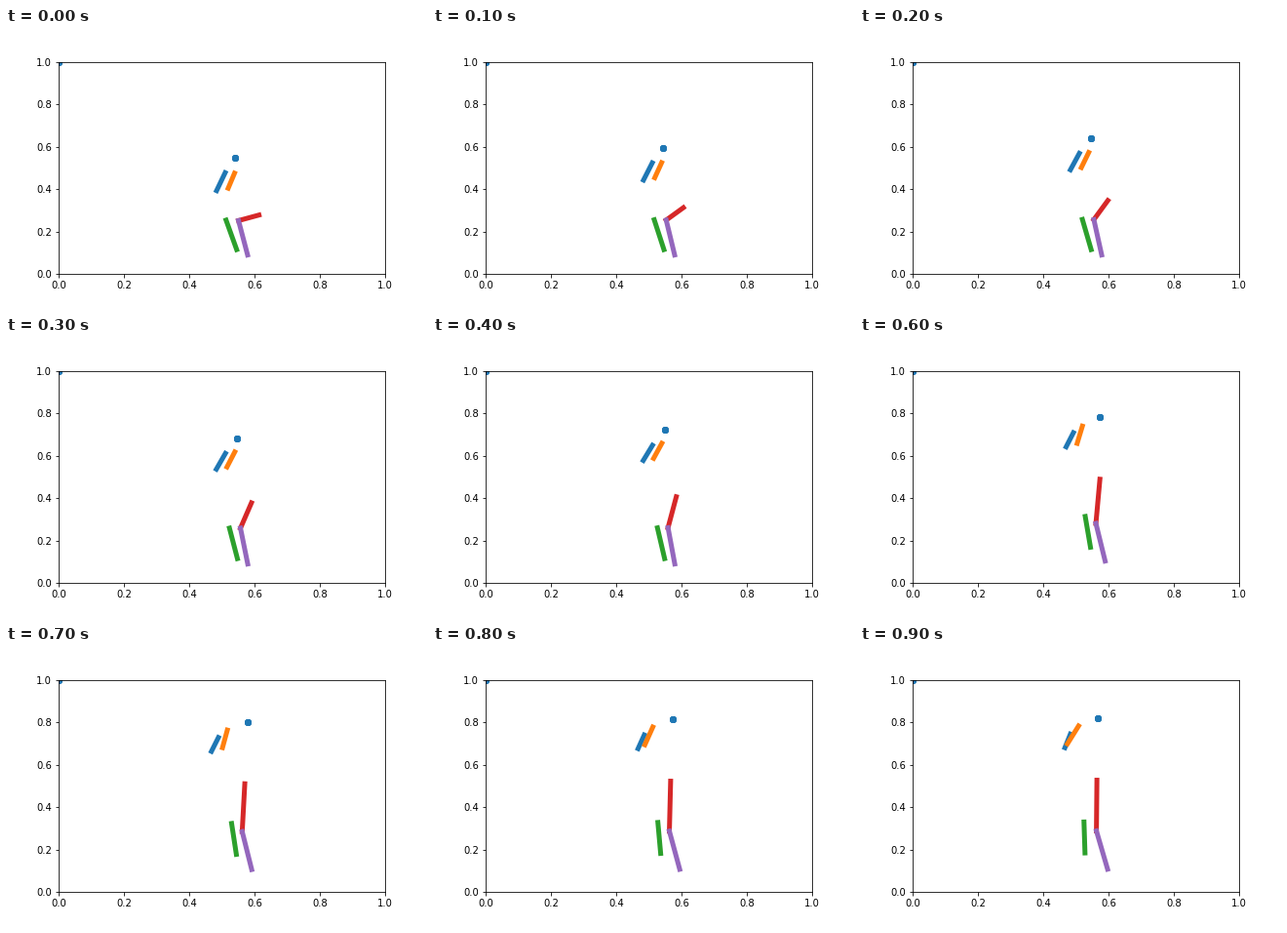
A matplotlib script that plays this animation: 432 by 288 pixels, repeating every 1 s.

```python
import numpy as np
import matplotlib.pyplot as plt
from matplotlib.animation import FuncAnimation

FRAMES, INTERVAL = 10, 100
LIFT_OFF = 4    # step after which the legs jump up
LEAN_BACK = 7   # step after which the body sways back
STACK = 4       # coinciding markers, which harden the dot edges

# Per joint, in stage pixels: start, travel while rising, travel in the jump,
# and sideways sway at the end.
JOINTS = {
    "head":    ((235.2, 133.0), (4.0, -59.0), (10.0, 0.0), -4.8),
    "elbow_a": ((224.9, 148.3), (0.5, -58.0), (-8.5, 0.0), -1.3),
    "wrist_a": ((216.1, 166.7), (-0.5, -62.5), (-5.5, 0.0), 0.0),
    "elbow_b": ((234.5, 148.8), (0.5, -62.0), (-9.0, -5.0), -2.0),
    "wrist_b": ((228.0, 164.2), (-2.5, -62.0), (-4.0, -2.0), -8.8),
    "knee_a":  ((225.8, 196.9), (7.0, -2.0), (-1.0, -15.0), -2.0),
    "ankle_a": ((236.7, 227.1), (1.5, 0.0), (-2.0, -15.5), -5.4),
    "hip_b":   ((259.6, 191.7), (-15.5, -43.5), (0.0, -11.0), -1.0),
    "knee_b":  ((238.6, 197.4), (4.0, -3.0), (0.0, -5.0), 0.0),
    "ankle_b": ((247.9, 232.6), (0.3, 0.0), (4.5, -4.0), 1.5),
}
LIMBS = [("elbow_a", "wrist_a"), ("elbow_b", "wrist_b"), ("knee_a", "ankle_a"),
         ("hip_b", "knee_b"), ("knee_b", "ankle_b")]

fig = plt.figure(figsize=(6, 4), dpi=72, facecolor="white")
ax = fig.add_axes([0.125, 0.125, 0.775, 0.755])
ax.set(xlim=(0, 1), ylim=(0, 1))
dots = ax.scatter([0, 0], [1, 1], color="C0")
bones = [ax.plot([], [], lw=5, color=f"C{i}", solid_capstyle="projecting")[0]
         for i in range(len(LIMBS))]


def joint(name, step):
    """Joint position at a step, in axes units."""
    start, rise, jump, sway = JOINTS[name]
    rising = np.sin(np.pi / 2 * step / (FRAMES - 1))
    jumping = 1 - 0.5 ** max(step - LIFT_OFF, 0)
    swaying = max(step - LEAN_BACK, 0) / (FRAMES - 1 - LEAN_BACK)
    x, y = np.array(start) + rising * np.array(rise) + jumping * np.array(jump)
    return (x + swaying * sway - 54) / 334.8, (252 - y) / 217.44


def draw(step):
    dots.set_offsets([(0, 1), joint("head", step)] * STACK)
    for bone, (start, end) in zip(bones, LIMBS):
        bone.set_data(*zip(joint(start, step), joint(end, step)))
    return [dots, *bones]


anim = FuncAnimation(fig, draw, frames=FRAMES, interval=INTERVAL,
                     repeat=True, repeat_delay=0)
plt.show()
```
